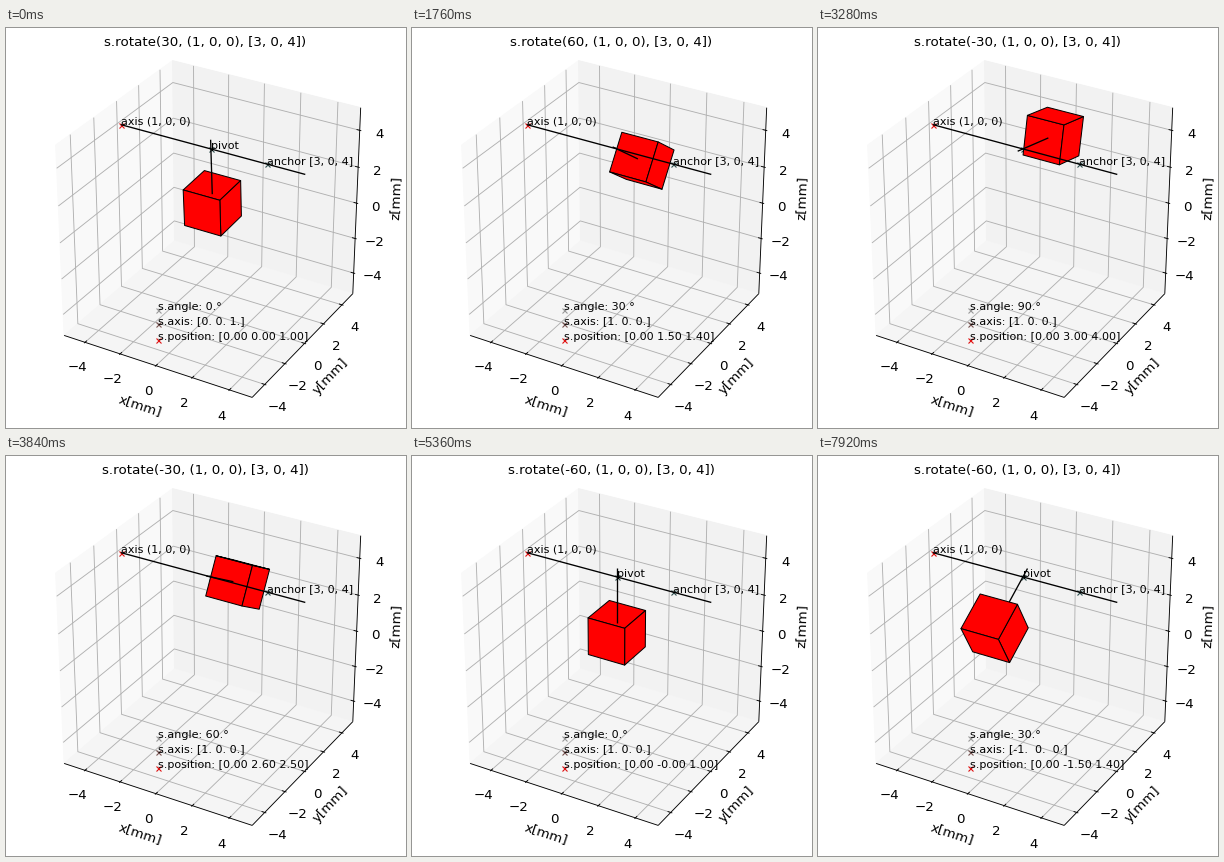
A matplotlib script that plays this animation: 400x400 px, repeating every 8000 ms.

```python
import itertools
import numpy as np
import matplotlib.pyplot as plt
from matplotlib.animation import FuncAnimation
from matplotlib.patches import Polygon

SIZE, DPI = 400, 80
PT = 72 / DPI                     # points per pixel
plt.rcParams["font.family"] = "DejaVu Sans"
BIG, SMALL = 12, 10               # font sizes in points

# Camera: elevation 30, azimuth -60, weak perspective
EL, AZ = np.radians(30), np.radians(-60)
RIGHT = np.array([-np.sin(AZ), np.cos(AZ), 0])
UP = np.array([-np.sin(EL) * np.cos(AZ), -np.sin(EL) * np.sin(AZ), np.cos(EL)])
EYE = np.array([np.cos(EL) * np.cos(AZ), np.cos(EL) * np.sin(AZ), np.sin(EL)])
CENTER = (204.9, 194.7)
SCALE, DIST = 20.84, 94.68
E = 5 * 25 / 24                   # half width of the axes box

TURNS = [30, 60, -30, -60, -30, -60]
TOTALS = np.concatenate([[0], np.cumsum(TURNS)])
MOVE, CYCLE = 10, 19              # frames in motion, frames per turn


def project(points):
    p = np.asarray(points, float)
    f = SCALE / (1 - p @ EYE / DIST)
    return np.stack([CENTER[0] + p @ RIGHT * f, CENTER[1] - p @ UP * f], axis=-1)


def swing(points, angle):
    """Rotate about the x-parallel axis through (0, 0, 4)."""
    x, y, z = np.asarray(points, float).T
    z = z - 4
    c, s = np.cos(np.radians(angle)), np.sin(np.radians(angle))
    return np.stack([x, y * c - z * s, y * s + z * c + 4], axis=-1)


fig = plt.figure(figsize=(SIZE / DPI, SIZE / DPI), dpi=DPI, facecolor="white")
ax = fig.add_axes([0, 0, 1, 1])
ax.set(xlim=(0, SIZE), ylim=(SIZE, 0))
ax.axis("off")


def line3d(points, color, width, zorder):
    x, y = project(points).T
    return ax.plot(x, y, color=color, lw=width, zorder=zorder,
                   solid_capstyle="butt")[0]


def marked_text(pos, text, color):
    ax.plot(*pos, "x", color=color, ms=5 * PT, mew=1, zorder=3)
    return ax.text(*pos, text, fontsize=SMALL, zorder=3)


def draw_box():
    walls = [([(-E, -E, -E), (-E, E, -E), (-E, E, E), (-E, -E, E)], 0.975),
             ([(-E, E, -E), (E, E, -E), (E, E, E), (-E, E, E)], 0.95),
             ([(-E, -E, -E), (E, -E, -E), (E, E, -E), (-E, E, -E)], 0.9625)]
    for corners, grey in walls:
        ax.add_patch(Polygon(project(corners), fc=str(grey), ec=str(grey),
                             lw=PT, zorder=0))

    def tick(c, edge, inward, label):
        edge, inward = np.array(edge), np.array(inward)
        line3d([edge - 0.083 * inward, edge + 0.167 * inward], "black", 0.8, 2)
        ax.text(*project(label), str(c).replace("-", "\u2212"),
                ha="center", va="top", fontsize=BIG, zorder=2)

    out = E + 0.7
    for c in range(-4, 5, 2):
        for path in ([(c, -E, -E), (c, E, -E), (c, E, E)],
                     [(E, c, -E), (-E, c, -E), (-E, c, E)],
                     [(-E, -E, c), (-E, E, c), (E, E, c)]):
            line3d(path, "#b0b0b0", 0.8, 1)
        tick(c, (c, -E, -E), (0, 1, 0), (c, -out, -out))
        tick(c, (E, c, -E), (-1, 0, 0), (out, c, -out))
        tick(c, (E, E, c), (-1, 0, 0), (out, out, c))

    out = E + 1.45
    spines = [("x[mm]", (-E, -E, -E), (E, -E, -E), (0, -out, -out)),
              ("y[mm]", (E, -E, -E), (E, E, -E), (out, 0, -out)),
              ("z[mm]", (E, E, -E), (E, E, E), (out, out, 0))]
    for name, start, end, at in spines:
        line3d([start, end], "black", 0.8, 2)
        dx, dy = project(end) - project(start)
        ax.text(*project(at), name, ha="center", va="center",
                rotation=np.degrees(np.arctan2(-dy, dx)),
                rotation_mode="anchor", fontsize=BIG, zorder=2)


def cube_faces():
    """Yield (corners, outward normal) of the cube around (0, 0, 1)."""
    ring = [(-1, -1), (1, -1), (1, 1), (-1, 1)]
    for axis, sign in itertools.product(range(3), (-1, 1)):
        corners = np.insert(np.array(ring, float), axis, sign, axis=1)
        normal = np.zeros(3)
        normal[axis] = sign
        yield corners + (0, 0, 1), normal


draw_box()
title = fig.text(0.4985, 0.98, "", ha="center", va="top", fontsize=BIG)
marked_text(project((-5, 0, 4)), "axis (1, 0, 0)", "#e01010")
marked_text(project((0, 0, 4)), "pivot", "#2f4f4f")
marked_text(project((3, 0, 4)), "anchor [3, 0, 4]", "#2f4f4f")
angle_text = marked_text((152.1, 282.2), "", "#999999")
axis_text = marked_text((152.1, 296.4), "", "#775350")
pos_text = marked_text((152.1, 312.1), "", "#e01010")
line3d([(-5, 0, 4), (5, 0, 4)], "black", 1.2, 7)

ARM = [(0, 0, 4.5), (0, 0, 1.5)]
arm = line3d(ARM, "black", 1.2, 5)
FACES = list(cube_faces())
# The arm lies over the cube's top face but behind its other faces.
patches = [ax.add_patch(Polygon(project(c), fc="red", ec="black", lw=0.9,
                                joinstyle="round", zorder=4 if n[2] > 0 else 6))
           for c, n in FACES]


def show_state(done):
    total = TOTALS[done]
    a = np.radians(total)
    y = 3 * np.sin(a) if total else (-0.0 if done else 0.0)
    z = 4 - 3 * np.cos(a)
    axis = "[-1.  0.  0.]" if total < 0 else "[1. 0. 0.]" if done else "[0. 0. 1.]"
    angle_text.set_text(f"s.angle: {abs(total)}.°")
    axis_text.set_text(f"s.axis: {axis}")
    pos_text.set_text(f"s.position: [0.00 {y:.2f} {z:.2f}]")


def update(frame):
    turn, k = divmod(frame, CYCLE)
    angle = TOTALS[turn] + TURNS[turn] * min(k + 1, MOVE) / MOVE
    title.set_text(f"s.rotate({TURNS[turn]}, (1, 0, 0), [3, 0, 4])")
    show_state(turn + (k >= MOVE))
    arm.set_data(*project(swing(ARM, angle)).T)
    for patch, (corners, normal) in zip(patches, FACES):
        pts = swing(corners, angle)
        mid, tip = swing([corners.mean(0), corners.mean(0) + normal], angle)
        patch.set_xy(project(pts))
        patch.set_visible((tip - mid) @ (EYE * DIST - mid) > 0)
    return []


anim = FuncAnimation(fig, update, frames=100, interval=80, repeat=True,
                     repeat_delay=0, init_func=lambda: update(0), blit=False)
plt.show()
```
